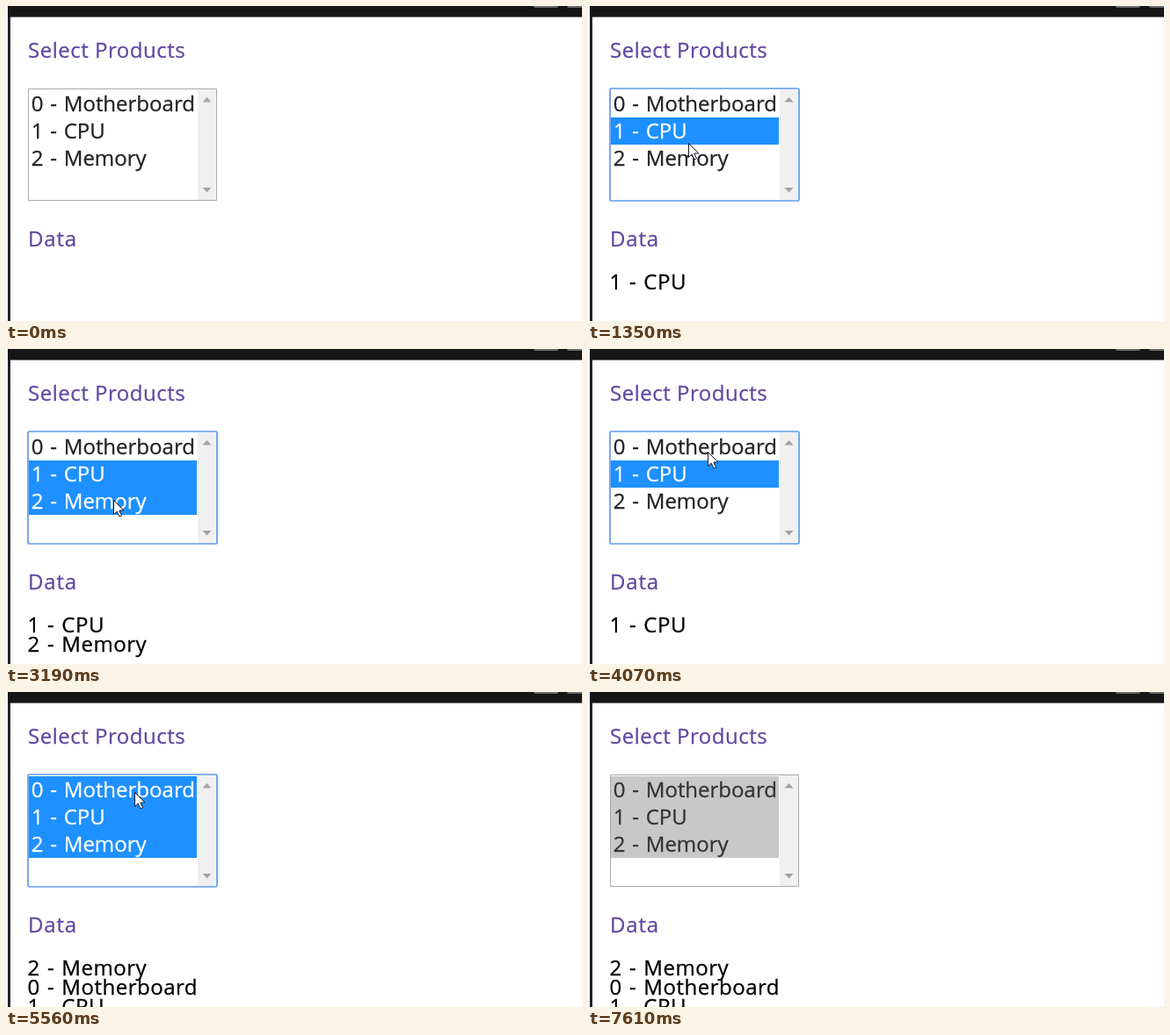
An HTML page with a canvas for the animation above (7.68 s loop, 655 px wide and 359 px high).

```html
<!DOCTYPE html>
<html lang="en">
<head>
<meta charset="utf-8">
<title>Select Products</title>
<style>
html, body { margin: 0; width: 100%; height: 100%; overflow: hidden; background: #fff; }
canvas { display: block; }
</style>
</head>
<body>
<canvas id="stage" width="655" height="359"></canvas>
<script>
const ctx = document.getElementById('stage').getContext('2d');
const LOOP = 7680, STEP = 70, ENTER = 90, LEAVE = 7610;
const FONT = '24px "Open Sans", "Noto Sans", sans-serif';
const PURPLE = '#6248a0';
const ITEMS = ['0 - Motherboard', '1 - CPU', '2 - Memory'];

// Pointer moves; "pick" is the selection made on arrival, in listed order
const MOVES = [
  { from: 90, to: 820, x: 118, y: 115, pick: [0] },
  { from: 890, to: 1240, x: 114, y: 156, pick: [1] },
  { from: 1420, to: 2050, x: 120, y: 114, pick: [1, 0] },
  { from: 2050, to: 2470, x: 122, y: 172, pick: [1, 2] },
  { from: 3190, to: 3400, x: 126, y: 142 },
  { from: 3510, to: 3580, x: 126, y: 142, pick: [1] },
  { from: 3580, to: 4310, x: 137, y: 114, pick: [0] },
  { from: 4490, to: 4920, x: 138, y: 172, pick: [2] },
  { from: 4920, to: 5420, x: 146, y: 114, pick: [2, 0, 1] },
  { from: 6470, to: 6960, x: 462, y: 103 },
  { from: 6960, to: 7190, x: 541, y: 80 },
  { from: 7260, to: 7540, x: 594, y: 2 }
];

const easeOut = k => k * (2 - k);

function stateAt(t) {
  let x = 533, y = 2, picked = [];
  for (const m of MOVES) {
    if (t < m.from) break;
    const passed = Math.floor((t - m.from) / STEP) * STEP;
    const k = t >= m.to ? 1 : easeOut(passed / (m.to - m.from));
    x += (m.x - x) * k;
    y += (m.y - y) * k;
    if (k === 1 && m.pick) picked = m.pick;
  }
  return { x, y, picked };
}

function rect(color, x, y, w, h) {
  ctx.fillStyle = color;
  ctx.fillRect(x, y, w, h);
}

function text(str, x, y, color, letter = 0, word = 0) {
  ctx.fillStyle = ctx.strokeStyle = color;
  ctx.lineWidth = 0.3;
  ctx.letterSpacing = letter + 'px';
  ctx.wordSpacing = word + 'px';
  ctx.fillText(str, x, y);
  ctx.strokeText(str, x, y);
}

function poly(points, fill, stroke) {
  ctx.beginPath();
  points.forEach(([x, y]) => ctx.lineTo(x, y));
  ctx.closePath();
  ctx.fillStyle = fill;
  ctx.fill();
  if (stroke) {
    ctx.strokeStyle = stroke;
    ctx.lineWidth = 1;
    ctx.stroke();
  }
}

function arrow(y, dir) {
  poly([[223.5, y], [228.5, y + 5.5 * dir], [233.5, y]], '#a3a3a3');
}

function frameBox(focused) {
  ctx.beginPath();
  ctx.strokeStyle = focused ? '#5e9bf0' : '#a9a9a9';
  ctx.lineWidth = focused ? 1.7 : 1;
  if (focused) ctx.roundRect(25, 94, 215, 128, 1.5);
  else ctx.rect(25.5, 94.5, 214, 127);
  ctx.stroke();
}

function list(picked, focused) {
  ITEMS.forEach((item, i) => {
    const on = picked.includes(i);
    if (on) rect(focused ? '#1e90ff' : '#c8c8c8', 26, 96 + 31 * i, 191, 31);
    const color = !on ? '#222' : focused ? '#fff' : '#333';
    text(item, 28.8, 120 + 31 * i, color, 0, 1.5);
  });
  rect('#f0f0f0', 218, 95, 21, 126);
  arrow(109.5, -1);
  arrow(207, 1);
  frameBox(focused);
}

function pointer(x, y) {
  ctx.save();
  ctx.translate(Math.round(x) + 0.5, Math.round(y) + 0.5);
  poly([[0, 0], [0, 16], [3.7, 12.6], [6.4, 18.5], [9, 17.4], [6.4, 11.6], [11.4, 11.4]],
    '#fff', '#1c1c28');
  ctx.restore();
}

function windowEdge() {
  rect('#222326', 2, 0, 3, 359);
  rect('#161616', 2, 0, 653, 12.6);
  ctx.fillStyle = '#6c6c6c';
  ctx.beginPath();
  for (const x of [600, 638]) ctx.roundRect(x, -6, 28, 8, 2);
  ctx.fill();
}

function draw(t) {
  const { x, y, picked } = stateAt(t);
  rect('#fff', 0, 0, 655, 359);
  windowEdge();

  ctx.font = FONT;
  text('Select Products', 25, 59, PURPLE, 0.53);
  text('Data', 25, 274, PURPLE, 0.8);
  list(picked, picked.length > 0 && t < LEAVE);
  picked.forEach((id, i) => text(ITEMS[id], 24.6, 323 + 22 * i, '#000', 0.5, 1.4));

  if (t >= ENTER && t < LEAVE) pointer(x, y);
}

const began = performance.now();
function tick() {
  draw((performance.now() - began) % LOOP);
  requestAnimationFrame(tick);
}
tick();
</script>
</body>
</html>
```
